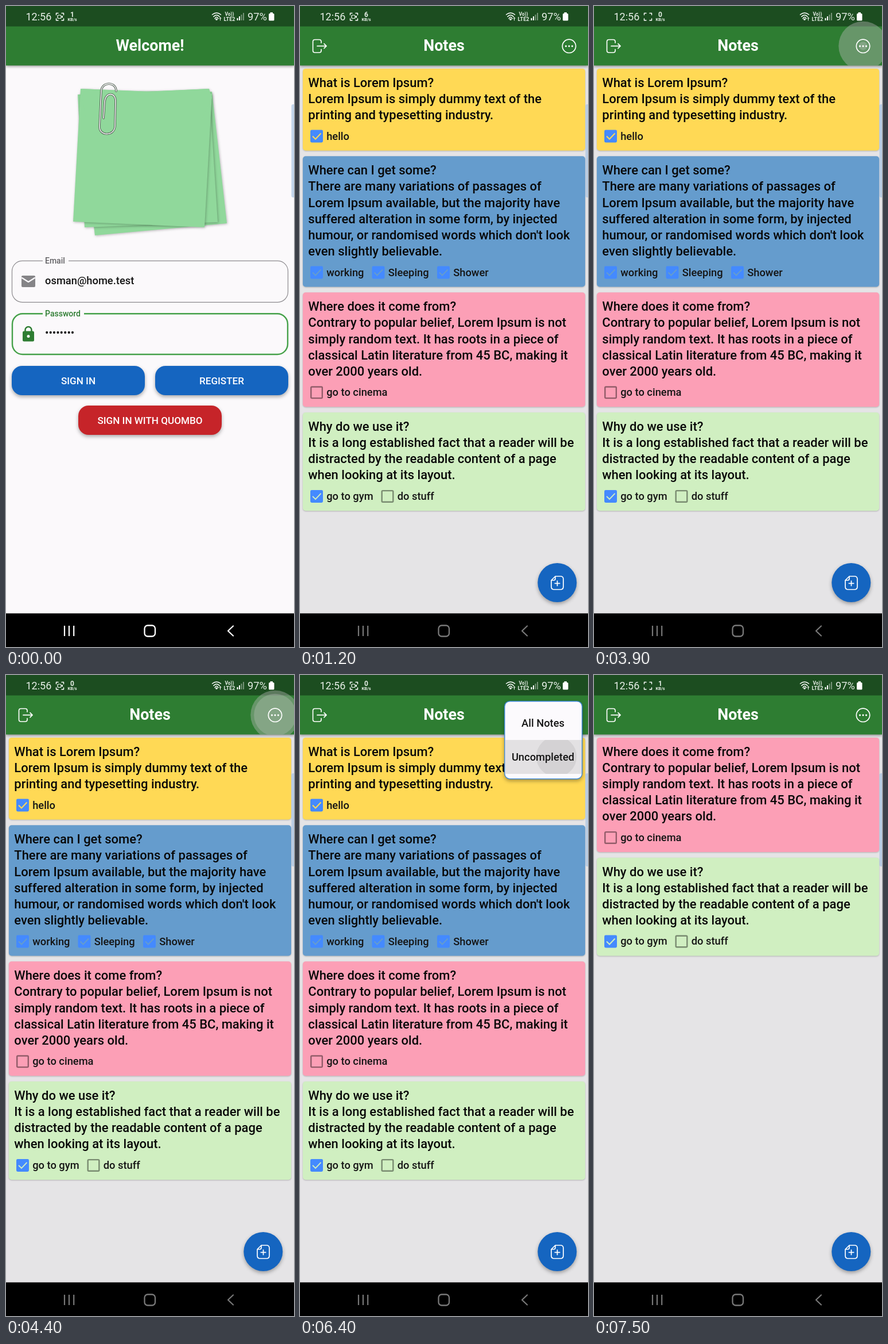
An HTML page for the animation above (8 s loop, 502 px wide and 1115 px high).

```html
<!DOCTYPE html>
<html lang="en">
<head>
<meta charset="utf-8">
<title>Notes app</title>
<style>
  html, body { margin: 0; width: 100%; height: 100%; overflow: hidden; background: #000; }
  svg { display: block; width: 502px; height: 1115px; }
  text { font: 500 18.32px Roboto, sans-serif; fill: #151515; white-space: pre; }
  .title { font-weight: 700; font-size: 26.85px; fill: #fff; }
  .body { font-size: 21.98px; fill: #080808; }
  .button { font-size: 17.1px; fill: #fff; }
  .label { font-size: 14px; }
  .status text { fill: #e6eee6; font-size: 18px; font-weight: 400; }
  .status .tiny { font-weight: 700; font-size: 7.5px; }
  .mid { text-anchor: middle; }
  .line { fill: none; stroke: #fff; stroke-width: 2; stroke-linecap: round; stroke-linejoin: round; }
  .bar { filter: drop-shadow(0 2px 2px rgba(0,0,0,.35)); }
  .card { filter: drop-shadow(0 1px 1px rgba(0,0,0,.22)); }
  .raised { filter: drop-shadow(0 3px 3px rgba(0,0,0,.32)); }
  .sheet { fill: #90d89b; filter: drop-shadow(1px 1px 2px rgba(0,0,0,.28)); }
</style>
</head>
<body>
<svg id="stage" viewBox="0 0 502 1115"></svg>
<script>
const $ = id => document.getElementById(id);
const set = (id, attrs) => { for (const k in attrs) $(id).setAttribute(k, attrs[k]); };
const clamp = v => Math.min(1, Math.max(0, v));
const span = (t, from, to) => clamp((t - from) / (to - from));

// Cubic Bezier easing with end points (0,0) and (1,1)
function bezier(x1, y1, x2, y2) {
  const at = (a, b, s) => 3 * a * s * (1 - s) ** 2 + 3 * b * s * s * (1 - s) + s ** 3;
  return x => {
    let lo = 0, hi = 1;
    for (let i = 0; i < 20; i++) {
      const s = (lo + hi) / 2;
      if (at(x1, x2, s) < x) lo = s; else hi = s;
    }
    return at(y1, y2, lo);
  };
}
const easeIn = bezier(.42, 0, 1, 1);
const fastOutSlowIn = bezier(.4, 0, .2, 1);

// Building blocks
const text = (x, y, str, cls = '', extra = '') => `<text x="${x}" y="${y}" class="${cls}" ${extra}>${str}</text>`;
const rect = (x, y, w, h, rx, fill, extra = '') =>
  `<rect x="${x}" y="${y}" width="${w}" height="${h}" rx="${rx}" fill="${fill}" ${extra}/>`;
const line = (d, extra = '') => `<path class="line" d="${d}" ${extra}/>`;
const button = (x, y, w, label, fill) =>
  rect(x, y, w, 51, 18, fill, 'class="raised"') + text(x + w / 2, y + 31.7, label, 'button mid');
const header = title =>
  rect(0, 35, 502, 68.5, 0, '#2e7d32', 'class="bar"') + rect(0, 0, 502, 35.5, 0, '#1c4d20') +
  text(251, 78, title, 'title mid');

function checkbox(x, y, label, checked, color) {
  const box = checked
    ? rect(x - 11, y - 11, 22, 22, 2.4, '#448aff') +
      line(`M${x - 7} ${y}l5 5l9.5 -10`, `style="stroke:${color};stroke-linecap:butt;stroke-linejoin:miter"`)
    : rect(x - 9.8, y - 9.8, 19.6, 19.6, 1.5, 'none', 'stroke="#000" stroke-opacity=".42" stroke-width="2.4"');
  return box + text(x + 17.2, y + 6, label);
}

const cardHeight = lines => 58 + 28.2 * lines;
function card(y, { color, lines, tasks }) {
  const h = cardHeight(lines.length);
  return rect(4.9, y, 492.2, h, 4.9, color, 'class="card"') +
    lines.map((s, i) => text(14.3, y + 32 + 28.1 * i, s, 'body')).join('') +
    tasks.map(([x, label, checked]) => checkbox(x, y + h - 25, label, checked, color)).join('');
}

const notes = [
  { color: '#ffd955', tasks: [[29, 'hello', 1]], lines: [
    'What is Lorem Ipsum?', 'Lorem Ipsum is simply dummy text of the', 'printing and typesetting industry.'] },
  { color: '#659ccd', tasks: [[29, 'working', 1], [136.5, 'Sleeping', 1], [250, 'Shower', 1]], lines: [
    'Where can I get some?', 'There are many variations of passages of', 'Lorem Ipsum available, but the majority have',
    'suffered alteration in some form, by injected', "humour, or randomised words which don't look",
    'even slightly believable.'] },
  { color: '#fc9fb6', tasks: [[29, 'go to cinema', 0]], lines: [
    'Where does it come from?', 'Contrary to popular belief, Lorem Ipsum is not', 'simply random text. It has roots in a piece of',
    'classical Latin literature from 45 BC, making it', 'over 2000 years old.'] },
  { color: '#d0efc1', tasks: [[29, 'go to gym', 1], [152.5, 'do stuff', 0]], lines: [
    'Why do we use it?', 'It is a long established fact that a reader will be', 'distracted by the readable content of a page',
    'when looking at its layout.'] }
];
const listTop = 108.9;
let nextTop = listTop;
const tops = notes.map(n => {
  const y = nextTop;
  nextTop += cardHeight(n.lines.length) + 9.8;
  return y;
});
const cards = (from, to) => notes.slice(from, to).map((n, i) => card(tops[from + i], n)).join('');

const clip = 'M192 148C192 131 167 131 166 148L163 209C162 227 189 227 190 209L191 167C192 149 173 149 172 167L170 195';
const login = rect(0, 0, 502, 1057, 0, '#fbf9fb') + header('Welcome!') +
  ['128 170 359 149 385 378 155 399', '125 154 354 144 369 376 137 385', '130 144 359 153 346 385 117 375']
    .map(p => `<polygon class="sheet" points="${p}"/>`).join('') +
  '<path d="M130 144L247 149L354 144L359 160L340 200H140Z" fill="#90d89b"/>' +
  line(clip, 'style="stroke:#4c5a4e;stroke-width:3.6"') + line(clip, 'style="stroke:#e4e6e4;stroke-width:1.8"') +
  rect(10.5, 443.3, 481, 72, 18, 'none', 'stroke="#8d8b8f" stroke-width="1.2"') +
  rect(64, 438, 45, 10, 0, '#fbf9fb') + text(68, 447.5, 'Email', 'label', 'style="fill:#626164"') +
  '<path d="M29 469H49Q51 469 51 471V487Q51 489 49 489H29Q27 489 27 487V471Q27 469 29 469Z" fill="#858487"/>' +
  line('M28 473L39 480L50 473', 'style="stroke:#fbf9fb;stroke-width:2.2"') +
  text(68, 484, 'osman@home.test') +
  rect(11, 535.3, 480, 70.7, 18, 'none', 'stroke="#45a149" stroke-width="2.4"') +
  rect(64, 530, 72, 10, 0, '#fbf9fb') + text(68, 539.5, 'Password', 'label', 'style="fill:#2e7d32"') +
  line('M33.5 567V563.5A5.5 5.5 0 0 1 44.5 563.5V567', 'style="stroke:#2e7d32;stroke-width:2.5"') +
  rect(29, 565.5, 20, 18, 2.5, '#2e7d32') + '<circle cx="39" cy="574.5" r="2.5" fill="#fbf9fb"/>' +
  text(68, 575, '••••••••') +
  button(10, 626, 232, 'SIGN IN', '#1565c0') + button(260, 626, 232, 'REGISTER', '#1565c0') +
  button(126, 695, 250, 'SIGN IN WITH QUOMBO', '#c62429');

const home = rect(0, 0, 502, 1057, 0, '#e5e4e6', 'id="paper"') +
  `<g id="first">${cards(0, 2)}</g><g id="rest">${cards(2, 4)}</g>` + header('Notes') +
  '<g clip-path="url(#barClip)"><circle id="glow" cx="469" cy="69.5" r="42.7" fill="#bcbcbc"/>' +
  '<circle id="splash" cx="469" cy="69.5" fill="#c8c8c8"/></g>' +
  line('M37 64V62Q37 58.5 33.5 58.5H26Q22.5 58.5 22.5 62V77.5Q22.5 81 26 81H33.5Q37 81 37 77.5V75.5M30 69.7H46M42 65.7L46 69.7L42 73.7',
    'style="stroke-width:1.7"') +
  '<circle class="line" cx="469" cy="69.8" r="11.7" style="stroke-width:1.7"/>' +
  [463.5, 469, 474.5].map(x => `<circle cx="${x}" cy="69.8" r="1.6" fill="#fff"/>`).join('') +
  '<circle class="raised" cx="448.3" cy="1003" r="34" fill="#1565c0"/>' +
  line('M445 992H454Q459 992 459 997V1010Q459 1015 454 1015H443Q438 1015 438 1010V999ZM445 992V996Q445 999 442 999H438M448.5 1000V1008.5M444.3 1004.3H452.7',
    'style="stroke-width:1.7"');

const menu = '<g class="raised">' + rect(356.7, 45.7, 135, 135, 9, '#fcfafd', 'id="panel" stroke="#4189d6" stroke-width="1.5"') + '</g>' +
  '<g clip-path="url(#menuClip)">' +
  rect(357.4, 113, 133.6, 59, 0, '#bcbcbc', 'id="pressed"') +
  '<circle id="touch" cx="447" cy="142" fill="#bcbcbc" clip-path="url(#itemClip)"/>' +
  text(423.5, 90, 'All Notes', 'mid', 'id="item0"') + text(423.5, 148.7, 'Uncompleted', 'mid', 'id="item1"') + '</g>';

const arc = (r, w) => `M${367 - w} ${25 - r}Q367 ${20 - r * 1.1} ${367 + w} ${25 - r}`;
const status = text(34.5, 25, '12:56') +
  line('M87.5 15.5V12.5H91M97 12.5H100.5V15.5M100.5 22V25H97M91 25H87.5V22', 'style="stroke-width:1.4"') +
  '<g id="camera">' + rect(90, 16, 6, 5.5, 1, 'none', 'stroke="#fff" stroke-width="1.2"') +
  '<path d="M96 18.7L99 16.5V21Z" fill="#fff"/></g>' +
  text(115.5, 19, '1', 'tiny mid', 'id="rate" style="font-size:12px"') + text(115.5, 26.3, 'KB/s', 'tiny mid') +
  line(arc(10, 7.5) + arc(6.5, 5.2) + arc(3, 3), 'style="stroke-width:1.5"') +
  '<circle cx="367" cy="23.3" r="1.7" fill="#fff"/>' +
  line('M373.5 25V20M372 21.5L373.5 20L375 21.5', 'style="stroke-width:1"') +
  text(389.5, 17, 'Vo))', 'tiny mid', 'style="font-size:8.5px"') + text(389.5, 25.5, 'LTE2', 'tiny mid', 'style="font-size:9px"') +
  [4, 7, 10, 13].map((h, i) => rect(402.5 + 3.5 * i, 25 - h, 2, h, 0, '#fff', `opacity="${i < 2 ? 1 : .4}"`)).join('') +
  text(421, 25, '97%', '', 'style="font-size:18.3px"') +
  rect(458, 13, 9.5, 12.5, 1.5, '#fff') + rect(460.5, 11, 4.5, 3, .5, '#fff');

const nav = rect(0, 1056.5, 502, 59, 0, '#000') + '<g id="keys">' +
  line('M102 1078V1096M110 1078V1096M118.2 1078V1096', 'style="stroke-width:2.2;stroke-linecap:butt"') +
  rect(241.5, 1077.5, 18.5, 19, 5.5, 'none', 'class="line" style="stroke-width:2.3"') +
  line('M396 1078.5L387 1087L396 1095.5', 'style="stroke-width:2.2"') + '</g>';

$('stage').innerHTML = `<defs>
  <clipPath id="barClip"><rect width="502" height="103.5"/></clipPath>
  <clipPath id="menuClip"><rect id="menuBox"/></clipPath>
  <clipPath id="itemClip"><rect x="357.4" y="113" width="133.6" height="59"/></clipPath></defs>
  <g id="login">${login}</g><g id="home">${home}</g>
  ${rect(497.5, 171, 8, 162, 3, '#9fbfe2', 'opacity=".6"')}
  <g id="menu">${menu}</g><g class="status">${status}</g>${nav}`;

function draw(t) {
  // Page change: fade in while moving up
  const enter = span(t, 246, 546);
  set('home', { opacity: easeIn(enter), transform: `translate(0 ${264 * (1 - fastOutSlowIn(enter))})` });
  set('login', { visibility: enter < 1 ? 'visible' : 'hidden' });
  set('paper', { fill: t < 560 ? '#fdfbfe' : '#e5e4e6' });
  set('keys', { opacity: 1 - .53 * span(t, 850, 1150) });

  const filtered = t >= 6500;
  set('first', { visibility: filtered ? 'hidden' : 'visible' });
  set('rest', { transform: `translate(0 ${filtered ? listTop - tops[2] : 0})` });

  // Held press on the menu button
  const release = 1 - span(t, 4990, 5190);
  set('glow', { opacity: .4 * span(t, 3720, 3900) * release });
  set('splash', { opacity: t > 3780 ? .3 * release : 0, r: 42.7 * span(t, 3780, 4500) });

  // Popup grows from its top right corner, its items fade in one by one
  const open = t < 6470 ? span(t, 4990, 5290) : clamp((1 - span(t, 6470, 6770)) * 1.5);
  const unit = 1 / 3.5;
  const w = 135 * clamp(open / unit), h = 135 * clamp(open / (2 * unit));
  const box = { x: 491.7 - w, y: 45.7, width: w, height: h };
  set('menu', { opacity: clamp(open * 3), visibility: open > 0 ? 'visible' : 'hidden' });
  set('panel', box);
  set('menuBox', box);
  for (const i of [0, 1]) set('item' + i, { opacity: span(open, unit * (i + 1), unit * (i + 2.5)) });

  const lift = 1 - span(t, 6470, 6670);
  set('pressed', { opacity: .4 * span(t, 6000, 6200) * lift });
  set('touch', { opacity: t > 6000 ? .4 * lift : 0, r: 96 * (span(t, 6035, 7035) + .8 * span(t, 6470, 6695)) });

  set('camera', { visibility: t % 1000 < 490 ? 'visible' : 'hidden' });
  $('rate').textContent = t < 1150 || t >= 7190 ? 1 : t < 2190 ? 6 : 0;
}

const start = performance.now();
function tick() {
  draw((performance.now() - start) % 8000);
  requestAnimationFrame(tick);
}
tick();
</script>
</body>
</html>
```
